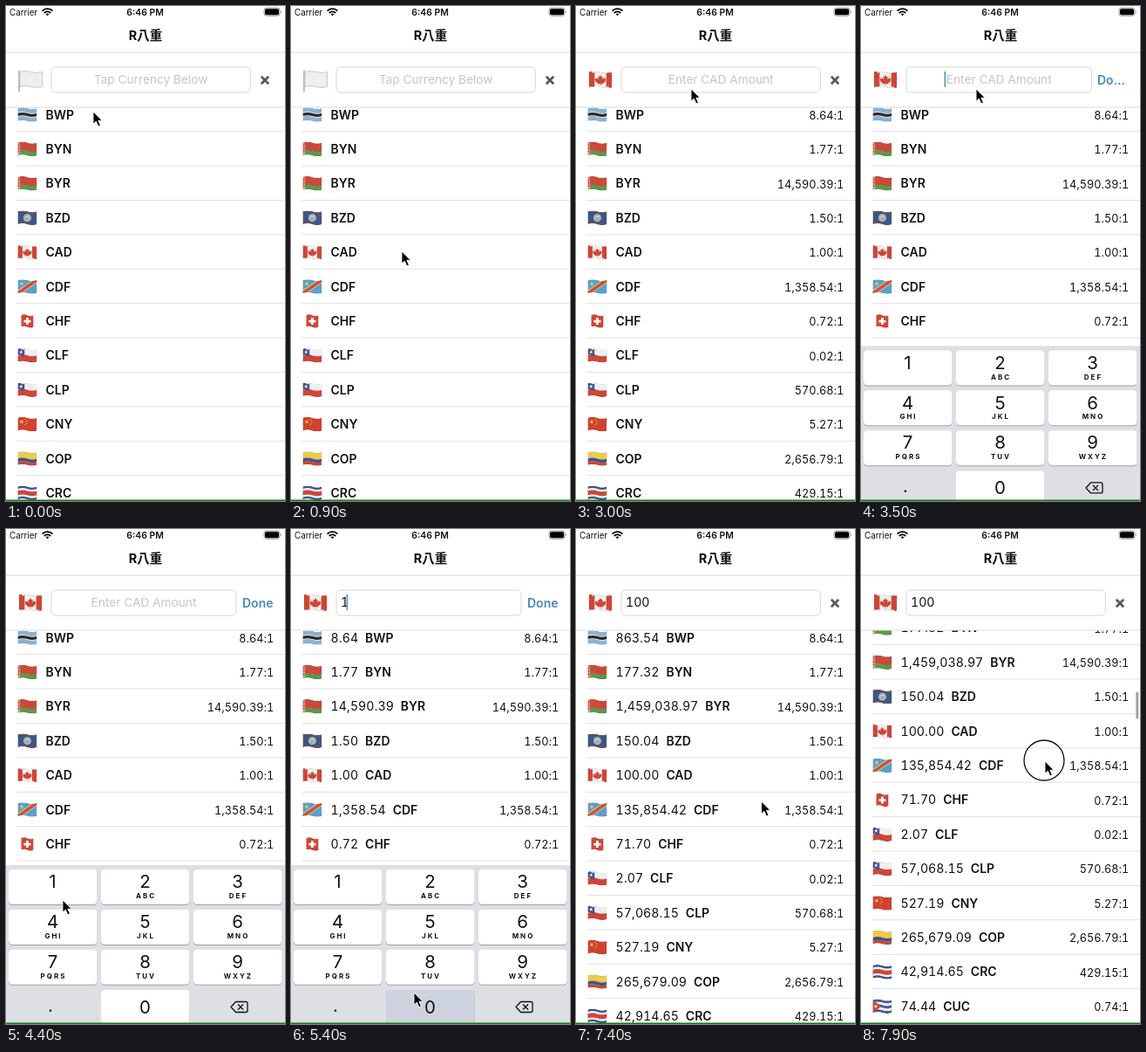
Recreate the animation shown at these times as an HTML page. Size 320x567 px, loop 8000 ms.

```html
<!DOCTYPE html>
<html lang="en">
<head>
<meta charset="utf-8">
<title>Currency list</title>
<style>
html, body { margin: 0; width: 100%; height: 100%; overflow: hidden; background: #fff; }
svg { display: block; width: 320px; height: 567px; font-family: Inter, "Noto Sans CJK JP", "Noto Sans CJK", sans-serif; }
text { fill: #111; }
.mid { text-anchor: middle; }
.num { font-size: 14.15px; }
.code { font-size: 14px; font-weight: 600; }
.rate { font-size: 12.65px; text-anchor: end; }
.tab { font-feature-settings: "tnum"; }
.hint { font-size: 13.7px; fill: #c5c5c8; }
.digit { font-size: 20.5px; }
.abc { font-size: 8px; font-weight: 700; letter-spacing: 2px; }
</style>
</head>
<body>
<svg viewBox="0 0 320 567">
  <defs><clipPath id="wave"></clipPath></defs>
  <rect width="320" height="567" fill="#fff"/>
  <g id="list"></g>
  <rect id="bar" x="315.3" width="3" height="31" rx="1.5" fill="#a3a3a3"/>

  <rect width="320" height="116" fill="#fff"/>
  <path d="M0 53.2H320M0 116H320" stroke="#d6d6d8" stroke-width=".9"/>
  <text x="4" y="10.6" font-size="9.8">Carrier</text>
  <g fill="none" stroke="#000" stroke-width="1.8">
    <path d="M41.6 5.6a8.3 8.3 0 0 1 11.8 0M43.8 8a5.2 5.2 0 0 1 7.4 0"/>
    <path d="M47.5 11.3l-1.8-1.8a2.5 2.5 0 0 1 3.6 0z" fill="#000" stroke="none"/>
  </g>
  <text class="mid" x="159.5" y="10.6" font-size="10.4" font-weight="600">6:46 PM</text>
  <rect x="296" y="2.2" width="18" height="9" rx="2.8" fill="none" stroke="#777" stroke-width=".8"/>
  <rect x="297" y="3.2" width="16" height="7" rx="1.8"/>
  <path d="M315 5.2q1.8 1.5 0 3z" fill="#888"/>
  <text class="mid" x="160" y="39.3" font-size="14.5" font-weight="700">R八重</text>
  <g id="flag"></g>
  <rect id="field" x="52" y="70" height="29" rx="4.5" fill="#fff" stroke="#d6d6d8"/>
  <text id="hint" class="hint mid" y="89"></text>
  <text id="typed" class="num tab" x="57" y="89"></text>
  <rect id="caret" y="75" width="1.5" height="18" fill="#4a8cc4"/>
  <path id="cross" d="M292.8 80.8l8.4 8.4m0-8.4l-8.4 8.4" stroke="#58585a" stroke-width="2.7"/>
  <text id="done" class="code" x="271" y="89.8"></text>

  <g id="keys"></g>
  <rect y="565.5" width="320" height="1.5" fill="#107c14"/>
  <circle id="touch" r="23" fill="none" stroke="#111" stroke-width="1.3"/>
  <path id="arrow" d="M0 0V14.2L3.3 11.2L5.8 16.8L8.4 15.7L5.9 10.2H10.3Z" stroke="#fff" stroke-width=".9"/>
</svg>
<script>
const $ = id => document.getElementById(id);
const set = (id, attrs) => { for (const k in attrs) $(id).setAttribute(k, attrs[k]); };
const show = (id, on) => set(id, { visibility: on ? 'visible' : 'hidden' });

// Flags live in a 24 x 16 box, made of wavy bands
const wavy = (y, h, x = 0, w = 24) =>
  `M${x} ${y}q${w / 4} -2 ${w / 2} 0t${w / 2} 0v${h}q${-w / 4} 2 ${-w / 2} 0t${-w / 2} 0z`;
const band = (y, h, c, x, w) => `<path d="${wavy(y, h, x, w)}" fill="${c}"/>`;
const shape = (d, c) => `<path d="${d}" fill="${c}"/>`;
const star = (x, y, r, c) => shape('M' + Array.from({ length: 10 }, (_, i) => {
  const a = i * Math.PI / 5, q = i % 2 ? r * .4 : r;
  return (x + q * Math.sin(a)).toFixed(2) + ' ' + (y - q * Math.cos(a)).toFixed(2);
}).join('L') + 'z', c);

const leaf = 'M12 3l1.2 2.2 1.3-.6-.5 3 2-1.6.4 1 1.6-.3-1 2.2.8.6-3 2 .2 1-2.7-.4v1.9h-.6V12.1l-2.7.4.2-1-3-2 .8-.6-1-2.2 1.6.3.4-1 2 1.6-.5-3 1.3.6z';
const red = '#cf4536', blue = '#3d558f', yellow = '#eecb48', white = '#efefef';
const belarus = band(0, 11, '#c94a3a') + band(10.5, 6, '#5a9a4a') + band(0, 16, '#dba596', 0, 3) +
  shape('M1.5 1l1 2-1 2 1 2-1 2 1 2-1 2-1-2 1-2-1-2 1-2-1-2z', red);
const chile = band(0, 8, white) + band(8, 8, red) + band(0, 8, blue, 0, 8.5) + star(4.2, 3.8, 2.5, '#fff');
const flags = {
  BW: band(0, 16, '#8bb2d2') + band(5.2, 5.6, white) + band(6.2, 3.6, '#2a2a2c'),
  BY: belarus,
  BZ: band(0, 16, '#3c5686') + band(0, 1.2, '#a5484c') + band(14.8, 1.2, '#a5484c') +
    '<circle cx="12" cy="8" r="4.8" fill="#d3dad6"/><circle cx="12" cy="8" r="3.6" fill="none" stroke="#7d9c82"/>' +
    shape('M10 7h4v2l-2 2-2-2z', '#8fa5b5'),
  CA: band(0, 16, white) + band(0, 16, red, 0, 6) + band(0, 16, red, 18, 6) + shape(leaf, red),
  CD: band(0, 16, '#5a9fce') + '<path d="M-1 17L25 -1" stroke="#e6d36a" stroke-width="6"/>' +
    '<path d="M-1 17L25 -1" stroke="#c9504a" stroke-width="4"/>' + star(5, 4.5, 3, yellow),
  CH: band(.8, 14.6, red, 4.5, 15) + shape('M10.5 3.8h3v2.9h2.9v3h-2.9v2.9h-3V9.7H7.6v-3h2.9z', '#fff'),
  CL: chile,
  CN: band(0, 16, '#cf4232') + star(5, 5, 3, yellow) +
    [[9.5, 2], [11.2, 4], [11.2, 6.6], [9.5, 8.6]].map(p => star(...p, 1.1, yellow)).join(''),
  CO: band(0, 8.2, yellow) + band(8, 4.2, blue) + band(12, 4, red),
  CR: band(0, 16, blue) + band(2.7, 10.6, white) + band(5.3, 5.4, red),
  CU: band(0, 16, '#42609c') + band(3.2, 3.2, white) + band(9.6, 3.2, white) +
    shape('M0 0L11 8L0 16z', red) + star(3.8, 8, 2.6, '#fff')
};
const flag = (name, x, y, s) => `<g transform="translate(${x} ${y}) scale(${s})"><g clip-path="url(#wave)">${flags[name]}` +
  (name === 'CH' ? '' : `<path d="${wavy(0, 16)}" fill="none" stroke="#000" stroke-opacity=".15"/>`) + '</g></g>';
const whiteFlag = '<path d="M15 74V98" stroke="#a9a9a9" stroke-width="1.6"/>' +
  `<path transform="translate(16 75.5)" d="${wavy(0, 17, 0, 25.5)}" fill="#efefef" stroke="#c4c4c4" stroke-width=".9"/>`;
$('wave').innerHTML = `<path d="${wavy(0, 16)}"/>`;

const rates = {
  BWP: 8.6354, BYN: 1.7732, BYR: 14590.3897, BZD: 1.5004, CAD: 1, CDF: 1358.5442, CHF: .717,
  CLF: .0207, CLP: 570.6815, CNY: 5.2719, COP: 2656.7909, CRC: 429.1465, CUC: .7444
};
const money = v => v.toLocaleString('en-US', { minimumFractionDigits: 2, maximumFractionDigits: 2 });
const tab = s => s.replace(/\d+/g, '<tspan class="tab">$&</tspan>');

function drawList(picked, amount) {
  $('list').innerHTML = Object.entries(rates).map(([code, rate], i) => {
    const y = 124.5 + 39.4 * i;
    const sum = amount ? `<tspan class="num">${tab(money(rate * amount))}\u00a0\u00a0</tspan>` : '';
    return flag(code.slice(0, 2), 13.4, y - 7.4, .92) +
      `<text x="45.5" y="${y + 5}" class="code"><tspan font-weight="400">${sum}</tspan>${code}</text>` +
      (picked ? `<text x="307.3" y="${y + 5.2}" class="rate">${tab(money(rate) + ':1')}</text>` : '') +
      `<path d="M12 ${y + 19.2}H320" stroke="#dedee0" stroke-width=".9"/>`;
  }).join('');
  $('flag').innerHTML = picked ? flag('CA', 14.7, 75.6, 1.11) : whiteFlag;
  $('hint').textContent = amount ? '' : picked ? 'Enter CAD Amount' : 'Tap Currency Below';
  $('typed').textContent = amount;
}

// Keypad, laid out for its resting place
const letters = ['', 'ABC', 'DEF', 'GHI', 'JKL', 'MNO', 'PQRS', 'TUV', 'WXYZ'];
const key = (n, x, y) => `<rect x="${x}" y="${y + 1}" width="101.5" height="40" rx="4.2" fill="#9fa1a6"/>` +
  `<rect id="key${n}" x="${x}" y="${y}" width="101.5" height="40" rx="4.2"/>`;
$('keys').innerHTML = '<rect y="385" width="320" height="190" fill="#dedfe4"/>' +
  letters.map((abc, i) => {
    const x = 3 + 106 * (i % 3), y = 390 + 45.9 * (i / 3 | 0);
    return key(i + 1, x, y) + `<text class="digit mid" x="${x + 50.5}" y="${y + 21.2}">${i + 1}</text>` +
      `<text class="abc mid" x="${x + 51.5}" y="${y + 33.1}">${abc}</text>`;
  }).join('') + key(0, 109, 528) +
  '<text class="digit mid" x="159.5" y="555">0</text><text class="digit mid" x="51" y="553">.</text>' +
  '<path d="M263.5 541.5H275q2 0 2 2v8q0 2-2 2H263.5L258 547.5zM266 544.5l6 6m0-6l-6 6" fill="none" stroke="#111" stroke-width="1.3" stroke-linejoin="round"/>';

// Pointer stops: time, x, y, sideways bulge on the way there
const stops = [
  [100, 100, 121, 0], [900, 127, 281, 16], [1950, 127, 281, 0], [2750, 132, 95, 12], [3650, 132, 95, 0],
  [4400, 65, 425, 0], [4650, 58, 411, 0], [4870, 58, 411, 0], [5270, 141, 531, 0], [5900, 141, 531, 0],
  [6550, 294, 85, 0], [6850, 294, 85, 0], [7450, 211, 316.5, 0], [7530, 211, 316.5, 0], [7900, 211, 266, 0]
];
function pointer(t) {
  const i = stops.findIndex(s => s[0] > t);
  if (i < 1) return (i ? stops[stops.length - 1] : stops[0]).slice(1, 3);
  const [t0, x0, y0] = stops[i - 1], [t1, x1, y1, bulge] = stops[i];
  const u = (t - t0) / (t1 - t0), e = u * u * (3 - 2 * u);
  return [x0 + (x1 - x0) * e + bulge * Math.sin(Math.PI * e), y0 + (y1 - y0) * e];
}
const spring = ms => ms <= 0 ? 0 : 1 - Math.exp(-ms * .018) * (1 + ms * .018);

const OPEN = 3190, CLOSE = 6780, DRAG = 7530;
const typing = [[4850, '1'], [5450, '10'], [5850, '100']];
const between = (t, a, b) => t >= a && t < b;
let state;

function draw(t) {
  const picked = t >= 1350;
  const [since, amount] = typing.filter(k => t >= k[0]).pop() || [3450, ''];
  if (state !== picked + amount) {
    drawList(picked, amount);
    state = picked + amount;
  }

  const up = spring(t - OPEN) - spring(t - CLOSE);
  const right = 280.3 - 16.3 * up;
  const editing = between(t, OPEN, CLOSE);
  set('field', { width: right - 52 });
  set('hint', { x: (52 + right) / 2 });
  set('keys', { transform: `translate(0 ${182 * (1 - up)})` });
  show('keys', up > .001);
  show('cross', !editing);
  show('done', editing);
  $('done').textContent = t < 3600 ? 'Do...' : 'Done';
  $('done').style.fill = t > 6640 ? '#84b0d3' : '#4789bd';
  set('caret', { x: amount ? 54.8 + 8.8 * amount.length : (right - 52) / 2 - 10.6 });
  show('caret', editing && (t < since || (t - since) % 1000 < 560));
  set('key1', { fill: between(t, 4750, 4850) ? '#ccd2de' : '#fff' });
  set('key0', { fill: between(t, 5330, 5450) || between(t, 5750, 5850) ? '#ccd2de' : '#fff' });

  const [x, y] = pointer(t), scroll = t > DRAG ? 316.5 - y : 0;
  set('arrow', { transform: `translate(${x} ${y})` });
  set('touch', { cx: x - 1, cy: y - 1 });
  show('touch', t >= DRAG);
  set('list', { transform: `translate(0 ${-scroll})` });
  set('bar', { y: 183.2 + scroll * .067 });
  show('bar', scroll > 0);
}

for (let n = 2; n < 10; n++) set('key' + n, { fill: '#fff' });
const start = performance.now();
function tick() {
  draw((performance.now() - start) % 8000);
  requestAnimationFrame(tick);
}
tick();
</script>
</body>
</html>
```
